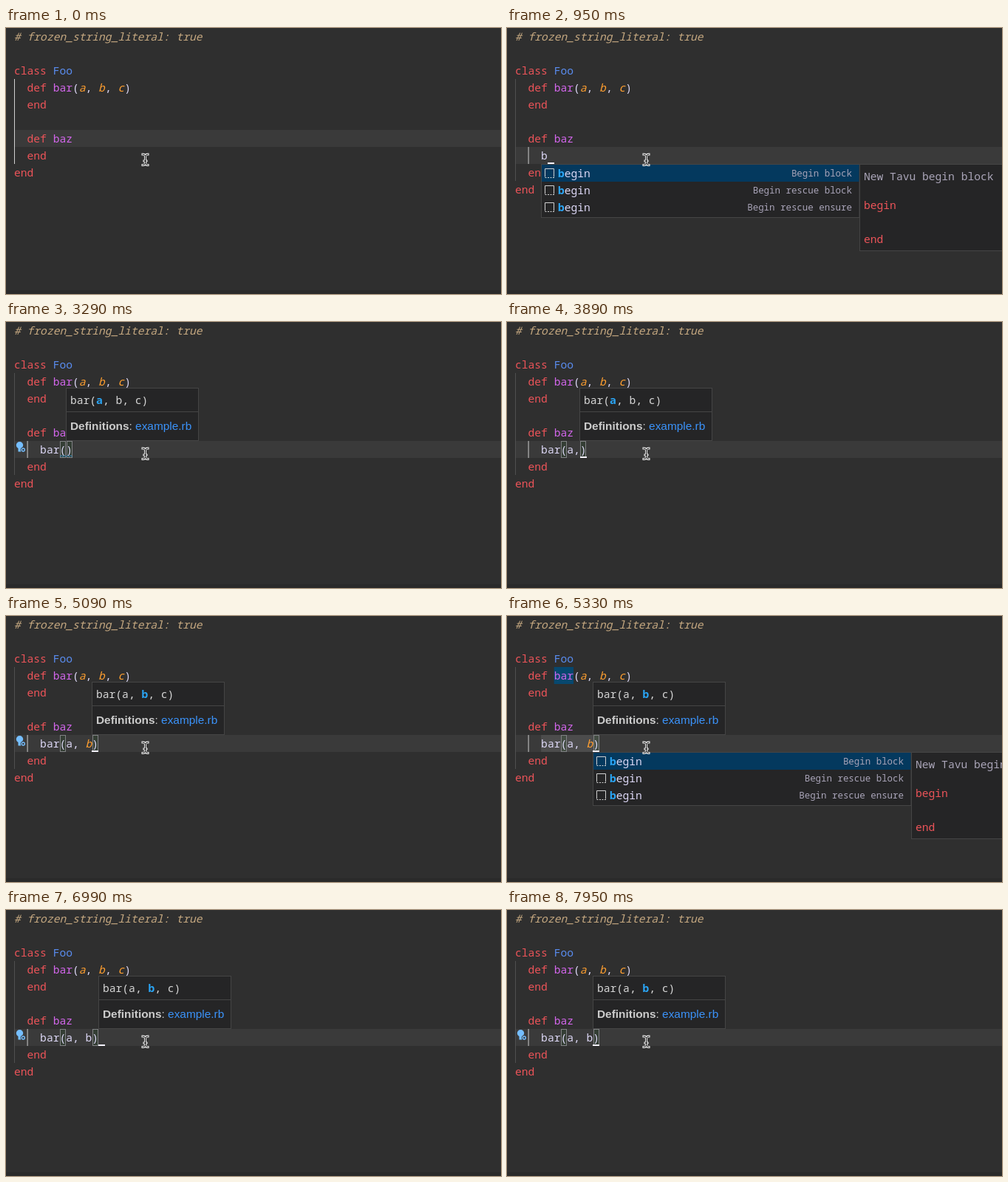
Write an HTML page that moves like this. It is 670 px wide and 360 px high and loops after 8 s.

```html
<!DOCTYPE html>
<html lang="en">
<head>
<meta charset="utf-8">
<title>Signature help</title>
<style>
  html, body { margin: 0; width: 100%; height: 100%; overflow: hidden; background: #2f2f2f; }
  svg { display: block; }
  text { font: 500 14.633px "Noto Sans Mono", monospace; white-space: pre; fill: #dcd7f5; }
  .com { fill: #c5a880; font-style: italic; }
  .key { fill: #ec5459; }
  .cls { fill: #5a8df0; }
  .fn { fill: #d366ec; }
  .arg { fill: #ff9f30; font-style: italic; }
  .hit { fill: #2aa5f5; font-weight: 700; }
  .sig { fill: #d6d6d6; }
  .hint { font-size: 12.45px; text-anchor: end; fill: #a9a4b8; }
  .doc { fill: #aaa5b8; }
  .sans { font: 15.4px "Liberation Sans", Arial, sans-serif; fill: #ccc; }
  .bold { font-weight: 700; }
  .link { fill: #3b93fa; }
  .box { fill: #252526; stroke: #454545; }
  .match { fill: rgba(0, 100, 0, .1); stroke: #808284; }
</style>
</head>
<body>
<svg id="stage" width="670" height="360" viewBox="0 0 670 360"></svg>
<script>
const LOOP = 8000, ROW = 23, CHAR = 8.78, LEFT = 11;
const stage = document.getElementById('stage');

const colX = c => LEFT + c * CHAR;
const edge = c => Math.floor(colX(c)) + 0.5;
const span = (cls, s) => `<tspan class="${cls}">${s}</tspan>`;
const text = (x, y, s, cls = '') => `<text x="${x}" y="${y}" class="${cls}">${s}</text>`;
const rect = (x, y, w, h, fill) => `<rect x="${x}" y="${y}" width="${w}" height="${h}" fill="${fill}"/>`;
const box = (x, y, w, h, cls) => `<rect x="${x}" y="${y}" width="${w}" height="${h}" class="${cls}"/>`;
const line = (row, col, s) => text(colX(col), row * ROW + 17, s);

const key = s => span('key', s);
const arg = s => span('arg', s);

const menus = {
  b: {
    items: [['begin', 'Begin block'], ['begin', 'Begin rescue block'], ['begin', 'Begin rescue ensure']],
    doc: [[206, 'doc', 'New Tavu begin block'], [245, 'key', 'begin'], [291, 'key', 'end']],
    height: 117
  },
  a: {
    items: [['attr_reader', 'Read attribute'], ['attr_writer', 'Write attribute'], ['attr_accessor', 'Access attribute']],
    doc: [[206, 'doc', 'New attribute reader'], [245, 'key', 'attr_reader']],
    height: 72
  }
};

// Each step changes part of the editor state and keeps the rest.
const steps = [
  [0, { open: false, code: '', col: 9, on: false, deep: false, sig: 0, param: 'a', menu: '', menuCol: 0,
        bulb: false, wave: false, marks: false, tint: false }],
  [60, { on: true }],
  [600, { on: false }],
  [660, { open: true, col: 4, on: true }],
  [890, { code: 'b', col: 5, deep: true }],
  [950, { menu: 'b', menuCol: 4 }],
  [1130, { code: 'ba', col: 6, menu: '' }],
  [1250, { code: 'bar', col: 7 }],
  [1730, { on: false }],
  [1790, { code: 'bar()', col: 8, on: true }],
  [1910, { sig: 8 }],
  [2030, { bulb: true, wave: true }],
  [2270, { on: false }],
  [2810, { on: true }],
  [3290, { on: false }],
  [3410, { code: 'bar(a)', col: 9, on: true, sig: 9, wave: false, menu: 'a', menuCol: 9 }],
  [3650, { bulb: false, marks: true }],
  [3890, { code: 'bar(a,)', col: 10, sig: 10, menu: '', marks: false }],
  [3950, { param: 'b' }],
  [4070, { code: 'bar(a, )', col: 11 }],
  [4130, { sig: 11 }],
  [4370, { bulb: true }],
  [4610, { on: false }],
  [5090, { code: 'bar(a, b)', col: 12, on: true, sig: 12, tint: true }],
  [5150, { menu: 'b', menuCol: 12 }],
  [5330, { bulb: false, marks: true }],
  [5560, { on: false, tint: false }],
  [6100, { on: true }],
  [6570, { on: false }],
  [6750, { col: 13, on: true, menu: '', marks: false }],
  [6810, { sig: 13 }],
  [6990, { bulb: true }],
  [7230, { on: false }],
  [7770, { on: true }],
  [7890, { col: 12 }],
  [7950, { sig: 12 }]
];

let last = {};
const states = steps.map(([at, change]) => (last = { ...last, ...change, at }));

function guides(s) {
  const bottom = s.open ? 207 : 184;
  return rect(11, 69, 1, bottom - 69, s.deep ? '#505050' : '#d0d0d0') +
    (s.deep ? rect(28.5, 161, 1.2, 23, '#b4b4b4') : '');
}

function brackets(s) {
  if (!s.code.endsWith(')')) return '';
  return [7, 3 + s.code.length].map(c => box(edge(c) + 1, 161.5, 7, 22, 'match')).join('');
}

function wave() {
  let d = 'M73 182.5';
  for (let i = 0; i < 8; i++) d += `l2.1 ${i % 2 ? 2 : -2}`;
  return `<path d="${d}" fill="none" stroke="#3794d0"/>`;
}

function bulb() {
  return `<circle cx="18.5" cy="166.7" r="4.7" fill="#75beff"/>` + rect(16.5, 170, 4, 5.5, '#75beff') +
    `<circle cx="23.3" cy="173" r="3.6" fill="#3a3a3a"/>` +
    `<circle cx="23.3" cy="173" r="2" fill="none" stroke="#75beff" stroke-width="1.4"/>`;
}

function code(s) {
  const shift = s.open ? 1 : 0;
  const call = s.tint ? s.code.replace('b)', arg('b') + ')') : s.code;
  return line(0, 0, span('com', '# frozen_string_literal: true')) +
    line(2, 0, key('class') + ' ' + span('cls', 'Foo')) +
    line(3, 2, key('def') + ' ' + span('fn', 'bar') + `(${arg('a')}, ${arg('b')}, ${arg('c')})`) +
    line(4, 2, key('end')) +
    line(6, 2, key('def') + ' ' + span('fn', 'baz')) +
    line(7, 4, call) +
    line(7 + shift, 2, key('end')) +
    line(8 + shift, 0, key('end'));
}

function signature(s) {
  const x = edge(s.sig);
  const params = ['a', 'b', 'c'].map(p => p === s.param ? span('hit', p) : p).join(', ');
  return box(x, 89.5, 179, 71, 'box') + rect(x, 121, 179, 1, '#454545') +
    text(x + 5.5, 111, `bar(${params})`, 'sig') +
    text(x + 5.5, 146, span('bold', 'Definitions') + ': ' + span('link', 'example.rb'), 'sans');
}

function icon(x, y) {
  return `<g fill="none" stroke="#d0d0d0"><path d="M${x} ${y + 11}V${y}H${x + 12}V${y + 11}"/>` +
    `<path d="M${x} ${y + 12}H${x + 13}" stroke-dasharray="2 1.5"/></g>`;
}

function menu(s) {
  const { items, doc, height } = menus[s.menu];
  const x = edge(s.menuCol);
  const rows = items.map(([name, hint], i) => {
    const y = 185 + i * ROW;
    return icon(x + 5, y + 5.5) +
      text(x + 22.5, y + 17, span('hit', name[0]) + name.slice(1)) +
      text(x + 420.5, y + 16, hint, 'hint');
  });
  return box(x + 431, 184.5, 250, height, 'box') +
    doc.map(([y, cls, str]) => text(x + 436.5, y, str, cls)).join('') +
    box(x, 184.5, 430.5, 72, 'box') + rect(x + .5, 185, 429.5, ROW, '#04395e') + rows.join('');
}

function pointer() {
  const d = 'M185 171Q188.5 171 188.5 173.5V183Q188.5 185.5 185 185.5M192 171Q188.5 171 188.5 173.5M188.5 183Q188.5 185.5 192 185.5M187 180H190';
  const stroke = (color, w) => `<path d="${d}" fill="none" stroke="${color}" stroke-width="${w}" stroke-linecap="square"/>`;
  return stroke('#f4f4f4', 3) + stroke('#111', 1);
}

function draw(s) {
  const row = s.open ? 7 : 6;
  stage.innerHTML =
    rect(0, 0, 670, 360, '#2f2f2f') + rect(0, 355, 670, 5, '#2a2a2a') +
    rect(12, row * ROW, 658, ROW, '#3a3a3a') +
    (s.marks ? rect(colX(6), 69, 3 * CHAR, ROW, '#07486f') + rect(colX(4), 161, s.code.length * CHAR, ROW, '#4c4c4c') : '') +
    guides(s) + brackets(s) + code(s) +
    (s.wave ? wave() : '') + (s.bulb ? bulb() : '') +
    (s.on ? rect(Math.round(colX(s.col)), row * ROW + 21, 9, 2, '#f5f3ff') : '') +
    (s.sig ? signature(s) : '') + (s.menu ? menu(s) : '') + pointer();
}

let shown;
const start = performance.now();
function tick() {
  const t = (performance.now() - start) % LOOP;
  const s = states.findLast(state => state.at <= t) || states[0];
  if (s !== shown) draw(shown = s);
  requestAnimationFrame(tick);
}
tick();
</script>
</body>
</html>
```
